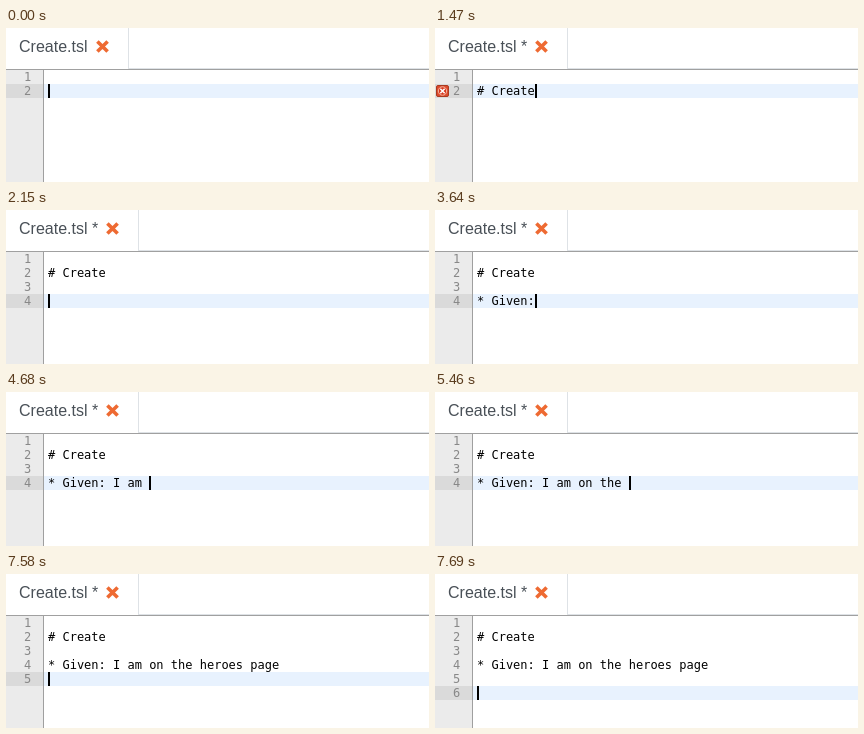
An HTML page that plays this animation: 423 by 154 pixels, repeating every 8 s.

```html
<!DOCTYPE html>
<html>
<head>
<meta charset="utf-8">
<style>
html, body { margin: 0; width: 100%; height: 100%; overflow: hidden; background: #fff; }
div, pre, svg { position: absolute; margin: 0; }
#rule { left: 0; right: 0; top: 40px; height: 1px; background: #dee2e6; }
#tab { left: 0; top: 0; height: 41px; background: #fff; border-right: 1px solid #dee2e6; }
#name { left: 13px; top: 10px; white-space: pre; color: #495057; font: 16px/18px "Liberation Sans", Arial, sans-serif; }
#close { top: 11px; }
#edge { left: 0; right: 0; top: 41px; height: 1px; background: #a0a0a0; }
#editor { left: 0; right: 0; top: 42px; bottom: 0; overflow: hidden; }
#gutter { left: 0; top: 0; bottom: 0; width: 37px; background: #ebebeb; border-right: 1px solid #9f9f9f; }
.active { height: 14px; }
#mark { left: 0; width: 37px; background: #dadada; }
#band { left: 38px; right: 0; background: #e8f2fe; }
pre { top: 0; font: 12px/14px "DejaVu Sans Mono", monospace; }
#nums { left: 18px; color: #888; }
#code { left: 42px; color: #000; }
#caret { width: 2px; background: #000; }
#error { left: 1px; top: 14px; }
</style>
</head>
<body>
<div id="rule"></div>
<div id="tab">
  <div id="name"></div>
  <svg id="close" width="15" height="15"><path d="M2.4 2.4 12.6 12.6M12.6 2.4 2.4 12.6" stroke="#ee6a32" stroke-width="3.6"/></svg>
</div>
<div id="edge"></div>
<div id="editor">
  <div id="gutter"></div>
  <div id="mark" class="active"></div>
  <div id="band" class="active"></div>
  <svg id="error" width="13" height="14">
    <rect x=".5" y="1.5" width="12" height="11" rx="1.5" fill="#dc4a2c" stroke="#a93a20"/>
    <circle cx="6.5" cy="7" r="4.2" fill="#d8361c" stroke="#f3b9a4"/>
    <path d="M4.3 4.8 8.7 9.2M8.7 4.8 4.3 9.2" stroke="#fff" stroke-width="1.6"/>
  </svg>
  <pre id="nums"></pre>
  <pre id="code"></pre>
  <div id="caret" class="active"></div>
</div>
<script>
const LOOP = 8000, ROW = 14, CHAR = 7.224;

// [first key time, keys, last key time]
const typing = [
  [150, '#'], [640, ' '], [930, 'C'], [1180, 'reate', 1470], [2030, '\n\n', 2150],
  [2480, '*'], [2640, ' '], [2920, 'G'], [3080, 'ive', 3280], [3420, 'n'],
  [3640, ':'], [3800, ' '], [4100, 'I'], [4330, ' '], [4510, 'am ', 4680],
  [4920, 'on', 4960], [5110, ' the ', 5460], [5660, 'he', 5780],
  [6250, 'roes', 6510], [6730, ' '], [7050, 'p'], [7130, 'ag'], [7210, 'e'],
  [7580, '\n\n', 7690]
];
const keys = typing.flatMap(([start, text, end = start]) =>
  [...text].map((key, i) => ({
    key, at: text.length > 1 ? start + (end - start) * i / (text.length - 1) : start
  })));

const el = id => document.getElementById(id);

function draw(t) {
  const text = '\n' + keys.filter(k => k.at <= t).map(k => k.key).join('');
  const lines = text.split('\n');
  const row = lines.length - 1;
  const dirty = t >= 150;

  el('name').textContent = dirty ? 'Create.tsl *' : 'Create.tsl';
  el('tab').style.width = (dirty ? 132 : 122) + 'px';
  el('close').style.left = (dirty ? 98.5 : 88.5) + 'px';
  el('error').style.display = t >= 680 && t < 2030 ? '' : 'none';

  el('code').textContent = text;
  el('nums').textContent = lines.map((_, i) => i + 1).join('\n');
  for (const id of ['mark', 'band', 'caret']) el(id).style.top = row * ROW + 'px';
  el('caret').style.left = Math.round(42 + lines[row].length * CHAR) + 'px';
}

function tick() {
  draw(performance.now() % LOOP);
  requestAnimationFrame(tick);
}
tick();
</script>
</body>
</html>
```
